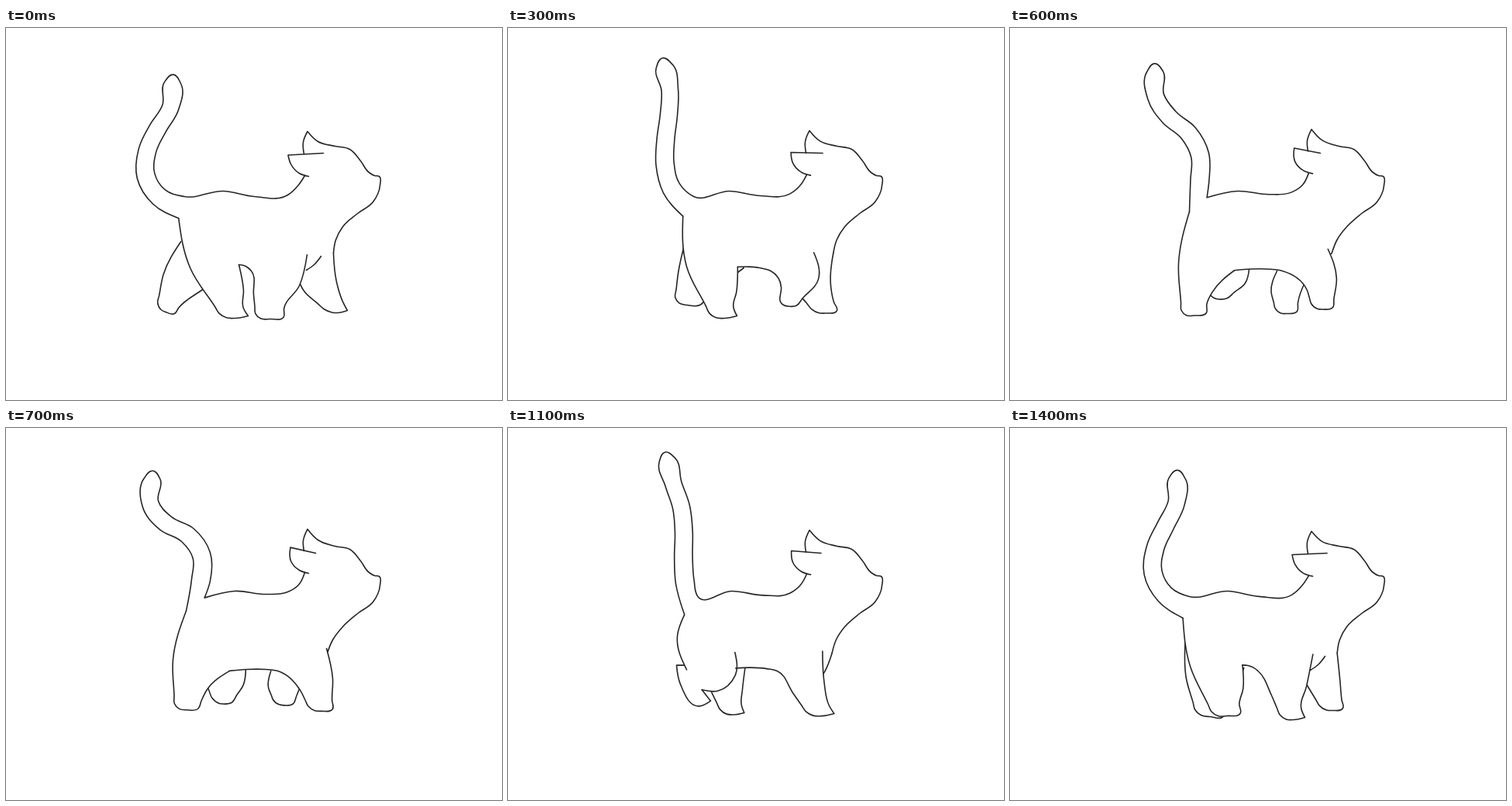
Animation, 640 px wide and 480 px high, one loop 1500 ms. Source, as an HTML page with a canvas:

```html
<!DOCTYPE html>
<html lang="en">
<head>
<meta charset="utf-8">
<title>Walking cat</title>
<style>
  html, body { margin: 0; width: 100%; height: 100%; overflow: hidden; background: #fff; }
  canvas { display: block; width: 640px; height: 480px; }
</style>
</head>
<body>
<canvas id="stage" width="640" height="480"></canvas>
<script>
const LOOP = 1500, STEP = 100;
const ctx = document.getElementById('stage').getContext('2d');

// Tail links, root to tip: heading in degrees = mean + a cos + b sin + c cos of the double angle.
const TAIL = [
  [-25, -40, -6, 0],
  [-11, -17, -2, -4],
  [-8, 19, -3, -8],
  [-11, 44, -2, -8],
  [-8, 35, 3, 4],
  [-5, 0, 0, 10]
];
const LINK = 32;

// Paw keys by time: heel x, y, toe x, y, backward bow of the rear edge, forward bow of the front edge.
const GAIT = {
  farHind: {
    0: [194, 360, 217, 368, 7, -8],
    200: [204, 363, 226, 368, 1, -10],
    400: [225, 343, 268, 346, 3, 6],
    600: [258, 347, 280, 348, 0, 9],
    900: [287, 366, 313, 365, 0, -1],
    1200: [270, 369, 300, 368, 0, -4],
    1400: [240, 369, 275, 371, 6, 0]
  },
  farFront: {
    0: [414, 366, 440, 364, 9, -5],
    200: [414, 366, 440, 364, 9, -6],
    400: [376, 368, 408, 364, 2, -6],
    600: [343, 367, 370, 365, 7, -12],
    900: [352, 332, 370, 336, 3, 0],
    1200: [390, 335, 404, 337, 0, 5],
    1400: [402, 363, 429, 361, 0, 0]
  },
  nearHind: {
    0: [278, 373, 312, 371, 13, 0],
    200: [275, 373, 308, 371, 14, -1],
    400: [249, 373, 282, 371, 13, -1],
    600: [221, 370, 253, 367, 9, -10],
    800: [213, 352, 242, 356, 10, -8],
    1400: [262, 371, 297, 367, 10, 2]
  },
  nearFront: {
    0: [322, 374, 358, 372, 0, 5],
    200: [333, 361, 352, 364, -7, 14],
    400: [366, 350, 392, 351, -9, 20],
    600: [390, 361, 416, 360, -12, 8],
    900: [396, 369, 431, 366, -1, -4],
    1200: [383, 371, 415, 369, 0, -6],
    1400: [350, 375, 380, 373, -2, -3]
  }
};

// Lifted near hind leg: x, y and how far each point travels during the fold.
const FOLD = { from: 900, to: 1200 };
const SHANK = [
  [217, 297, 14, 13], [205, 295, 18, 16], [207, 328, 22, 2],
  [224, 353, 34, 8], [237, 347, 36, 7], [231, 330, 28, 11]
];
const HAUNCH = [[214, 268, 6, 0], [218, 304, 18, 11]];
const THIGH = [[231, 330, 28, 11], [255, 338, 23, 1], [287, 318, 8, 2], [293, 293, -1, -6]];

const lerp = (a, b, f) => a + (b - a) * f;
const mix = (p, q, f) => [lerp(p[0], q[0], f), lerp(p[1], q[1], f)];
const add = (p, x, y = 0) => [p[0] + x, p[1] + y];
const dist = (p, q) => Math.hypot(q[0] - p[0], q[1] - p[1]) || 1e-6;
const toward = (p, q, d) => mix(p, q, Math.min(0.5, d / dist(p, q)));
const polar = (p, deg, r) => {
  const a = deg * Math.PI / 180;
  return [p[0] + r * Math.sin(a), p[1] - r * Math.cos(a)];
};

function keyed(track, t) {
  const times = Object.keys(track).map(Number);
  const last = times.filter(k => k <= t).pop();
  const next = times.find(k => k > t) ?? LOOP;
  const to = track[next % LOOP];
  return track[last].map((v, i) => lerp(v, to[i], (t - last) / (next - last)));
}

// Unit tangent at a point, or null at ends and sharp corners.
function tangent(a, p, b) {
  if (!a || !b) return null;
  const d1 = dist(a, p), d2 = dist(p, b);
  const u = [(p[0] - a[0]) / d1, (p[1] - a[1]) / d1];
  const w = [(b[0] - p[0]) / d2, (b[1] - p[1]) / d2];
  if (u[0] * w[0] + u[1] * w[1] < -0.15) return null;
  const v = mix(u, w, d1 / (d1 + d2));
  const len = Math.hypot(...v);
  return [v[0] / len, v[1] / len];
}

// Smooth line through the points, optionally filled and stroked.
function curve(pts, { fill = false, stroke = true } = {}) {
  const tan = pts.map((p, i) => tangent(pts[i - 1], p, pts[i + 1]));
  ctx.beginPath();
  ctx.moveTo(...pts[0]);
  for (let i = 1; i < pts.length; i++) {
    const p = pts[i - 1], q = pts[i], h = dist(p, q) * 0.36;
    const s = tan[i - 1], e = tan[i];
    let c1 = s && add(p, s[0] * h, s[1] * h);
    let c2 = e && add(q, -e[0] * h, -e[1] * h);
    c1 = c1 || mix(p, c2 || q, 0.5);
    c2 = c2 || mix(q, c1, 0.5);
    ctx.bezierCurveTo(...c1, ...c2, ...q);
  }
  if (fill) ctx.fill();
  if (stroke) ctx.stroke();
}

// Leg outline from its rear top, round the paw, to its front top.
function leg(rear, front, [hx, hy, tx, ty, back, fore]) {
  const heel = [hx, hy], toe = [tx, ty];
  const shin = add(mix(rear, heel, 0.5), -back);
  const knee = add(mix(toe, front, 0.5), fore);
  const sole = add(mix(heel, toe, 0.5), 0, 2);
  const notch = Math.max(0, ty - 360) / 2.5;
  return [
    rear, shin, toward(heel, shin, 16), toward(heel, shin, 6), toward(heel, sole, 6),
    sole, toe, add(toward(toe, knee, 11), -notch), knee, front
  ];
}

// Tail outline; its first and last points are the two sides of the root.
function tailLine(base, w) {
  const c = Math.cos(w), s = Math.sin(w), c2 = Math.cos(2 * w);
  const turns = TAIL.map(([m, a, b, d]) => m + a * c + b * s + d * c2);
  const rootTurn = -55 - 20 * c;
  const left = [polar(base, rootTurn - 90, 14.5)];
  const right = [polar(base, rootTurn + 90, 14.5)];
  let joint = base;
  turns.forEach((turn, i) => {
    joint = polar(joint, turn, LINK);
    const across = (turn + (turns[i + 1] ?? turn)) / 2;
    const half = lerp(12, 10.5, i / 5);
    left.push(polar(joint, across - 90, half));
    right.unshift(polar(joint, across + 90, half));
  });
  return [...left, polar(joint, turns[5], 10.5), ...right];
}

function draw(t) {
  const w = t / LOOP * 2 * Math.PI;
  const c = Math.cos(w), s = Math.sin(w), c2 = Math.cos(2 * w);
  const tail = tailLine([235 - 9 * c, 229 + 2 * c], w);
  const rump = tail[0];
  const groin = [294 + 6 * c, 309 - 4 * c];
  const armpit = [339 - 17 * c - 6 * c2, 313];
  const shoulder = [401 - 13 * c - 3 * s, 288 + 4 * c];
  const breast = [418 + 4 * c, 290];
  const paw = name => keyed(GAIT[name], t);

  ctx.fillRect(0, 0, 640, 480);

  curve(leg([rump[0] + 3, 275], [305 - 4 * c, 309], paw('farHind')), { fill: true });
  curve(leg([357 + 16 * c, 313], breast, paw('farFront')), { fill: true });

  // Tail and back
  curve([
    ...tail, [287 - 7 * c, 210], [328 - 8 * c, 215.5 + 1.5 * c],
    [363, 213 + 2 * c], [377, 202], [385, 188 + 2 * c]
  ]);
  // Far ear, face and chest
  curve([
    [384, 160 + 2 * c], [383, 146 + c], [388.5, 131.5 + 1.5 * c], [402, 145 + c],
    [424, 152], [443, 156], [457, 171], [468, 186], [475, 190], [481, 191],
    [482, 203], [473, 224], [453, 239], [434, 256], [423 + 2 * c, 273], breast
  ]);
  // Near ear
  curve([
    [390, 189 + 2 * c], [378, 185 + 2 * c], [367, 173 + 2 * c],
    [365 - 1.5 * c, 158.5 + 5 * c], [404 + 5 * c, 161]
  ]);

  if (t >= FOLD.from && t <= FOLD.to) {
    const u = (t - FOLD.from) / (FOLD.to - FOLD.from);
    const move = pts => pts.map(([x, y, dx, dy]) => [x + dx * u, y + dy * u]);
    const haunch = [rump, ...move(HAUNCH)], thigh = move(THIGH);
    curve([...haunch, ...thigh], { fill: true, stroke: false });
    curve(move(SHANK), { fill: true });
    curve(haunch);
    curve(thigh);
  } else {
    curve(leg(rump, groin, paw('nearHind')), { fill: true });
  }

  // Belly running into the near front leg
  const belly = [groin, add(mix(groin, armpit, 0.35), 0, -2), add(mix(groin, armpit, 0.75), 0, -2)];
  curve([...belly, ...leg(armpit, shoulder, paw('nearFront'))], { fill: true });

  // Elbow crease while the near leg is back
  if (c > 0.6) curve([[387, 312], [397, 305], [406, 294]]);
}

ctx.translate(0.5, 0.5);
ctx.fillStyle = '#fff';
ctx.strokeStyle = '#262626';
ctx.lineWidth = 1.6;
ctx.lineCap = ctx.lineJoin = 'round';

const start = performance.now();
let shown = -1;
function tick() {
  const t = Math.floor((performance.now() - start) % LOOP / STEP) * STEP;
  if (t !== shown) draw(shown = t);
  requestAnimationFrame(tick);
}
tick();
</script>
</body>
</html>
```
